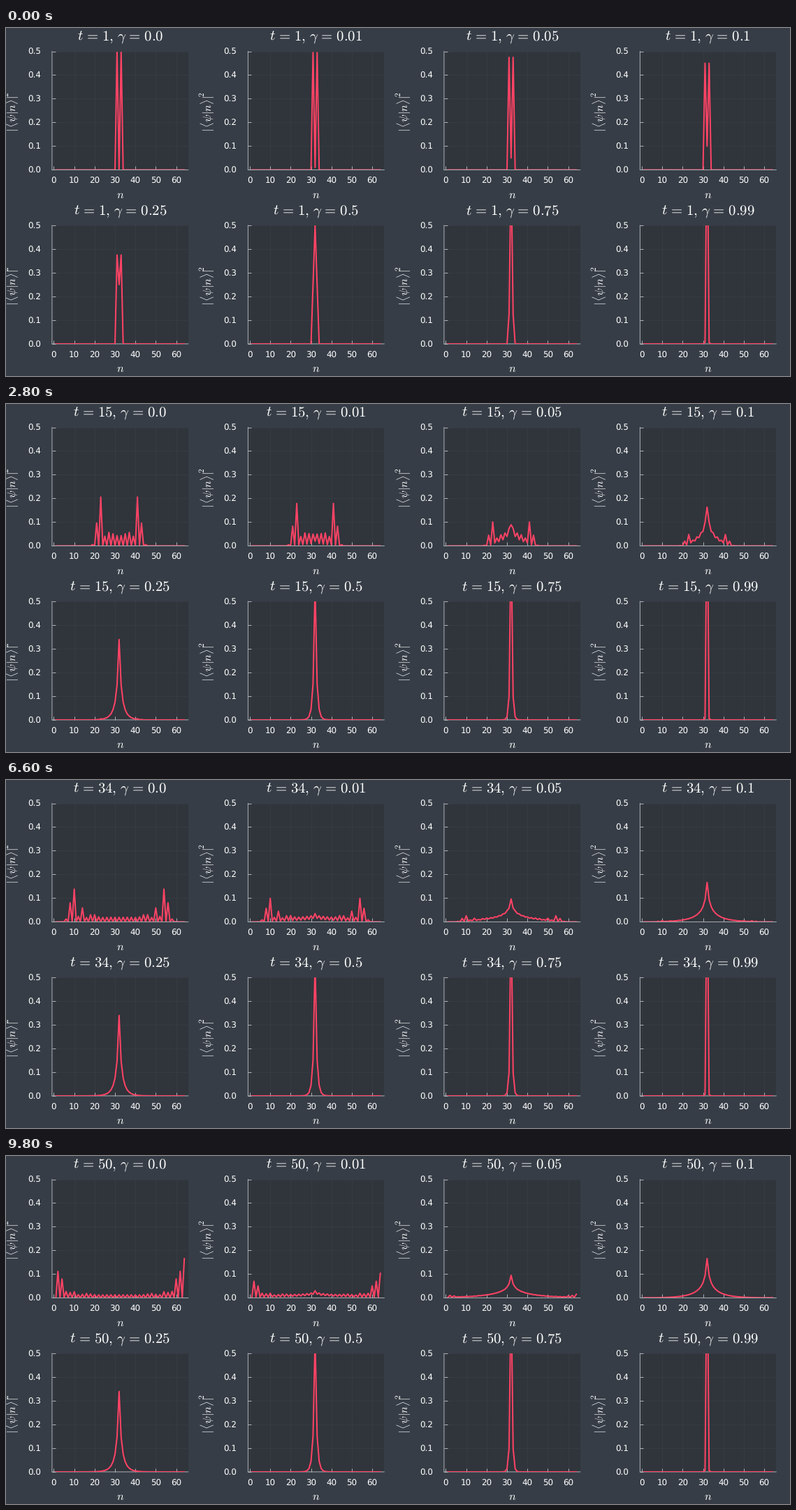
A matplotlib script that plays this animation: 1122 by 499 pixels, repeating every 10 s.

```python
import numpy as np
import matplotlib.pyplot as plt
from matplotlib.animation import FuncAnimation

W, H, DPI = 1122, 499, 100
PX = 72 / DPI  # points per pixel
BG, INSIDE, AXIS, TEXT, LINE = "#363D46", "#30343B", "#ADB2B7", "#FFFFFF", "#FE4365"

SITES, START, STEPS = 64, 32, 50
GAMMAS = [0.0, 0.01, 0.05, 0.1, 0.25, 0.5, 0.75, 0.99]

plt.rcParams["mathtext.fontset"] = "cm"
plt.rcParams["font.family"] = "DejaVu Sans"
plt.rcParams["text.hinting"] = "none"


def hadamard_walk():
    """Site probabilities of a symmetric walk on a ring, one row per step."""
    left = np.zeros(SITES, complex)
    right = np.zeros(SITES, complex)
    left[START - 1], right[START - 1] = np.sqrt(0.5), 1j * np.sqrt(0.5)
    rows = []
    for _ in range(STEPS + 1):
        rows.append(abs(left) ** 2 + abs(right) ** 2)
        left, right = (left + right) / np.sqrt(2), (left - right) / np.sqrt(2)
        left, right = np.roll(left, -1), np.roll(right, 1)
    return np.array(rows)


def with_resets(walk, gamma):
    """Probabilities when each step restarts the walk with chance gamma."""
    rows = [walk[0]]
    mixed = np.zeros(SITES)
    for t in range(1, STEPS + 1):
        mixed = mixed + gamma * (1 - gamma) ** (t - 1) * walk[t - 1]
        rows.append(mixed + (1 - gamma) ** t * walk[t])
    return np.array(rows)


fig = plt.figure(figsize=(W / DPI, H / DPI), dpi=DPI, facecolor=BG)


def put_text(x, y, s, size, **kw):
    return fig.text(x / W, 1 - y / H, s, fontsize=size * PX, color=TEXT,
                    ha="center", va="baseline", **kw)


def put_upright(x, y, s, size):
    put_text(x, y, s, size, rotation=90, rotation_mode="anchor")


def title_text(t, gamma):
    eq = r"\hspace{0.116}=\hspace{0.116}"
    return rf"$t{eq}{t},\hspace{{0.14}}\gamma{eq}{gamma}$"


def make_panel(index):
    row, col = divmod(index, 4)
    x, bottom, w, h = 65.9 + 280.5 * col, 203.4 + 249.5 * row, 194.8, 169.9
    ax = fig.add_axes([x / W, 1 - bottom / H, w / W, h / H], facecolor=INSIDE)
    ax.set(xlim=(-0.89, 65.89), ylim=(0, 0.5),
           xticks=range(0, 61, 10), yticks=np.arange(6) / 10)
    ax.set_axisbelow(True)
    ax.grid(color=AXIS, alpha=0.05, linewidth=PX)
    ax.tick_params(direction="in", length=5 * PX, width=PX, color=AXIS,
                   labelcolor=TEXT, labelsize=11.9 * PX)
    ax.tick_params(axis="x", pad=10.6 * PX)
    ax.tick_params(axis="y", pad=15.8 * PX)
    for side, spine in ax.spines.items():
        spine.set(color=AXIS, linewidth=PX, zorder=1.5, snap=False,
                  visible=side in ("left", "bottom"))
    curve, = ax.plot([], [], color=LINE, linewidth=2 * PX)

    middle = x + w / 2
    title = put_text(middle, bottom - 184.6, "", 20.75)
    put_text(middle, bottom + 40.3, "$n$", 16.3)
    put_upright(x - 52, bottom - 80.5, r"$|\,\langle\psi|n\rangle|$", 16.3)
    put_upright(x - 62.2, bottom - 107.7, "$2$", 11.4)
    return curve, title


walk = hadamard_walk()
histories = [with_resets(walk, g) for g in GAMMAS]
panels = [make_panel(i) for i in range(len(GAMMAS))]
sites = np.arange(1, SITES + 1)


def update(frame):
    t = frame + 1
    for (curve, title), history, gamma in zip(panels, histories, GAMMAS):
        curve.set_data(sites, history[t])
        title.set_text(title_text(t, gamma))
    return [artist for panel in panels for artist in panel]


anim = FuncAnimation(fig, update, frames=STEPS, interval=200,
                     init_func=lambda: update(0), repeat=True, repeat_delay=0)
plt.show()
```
